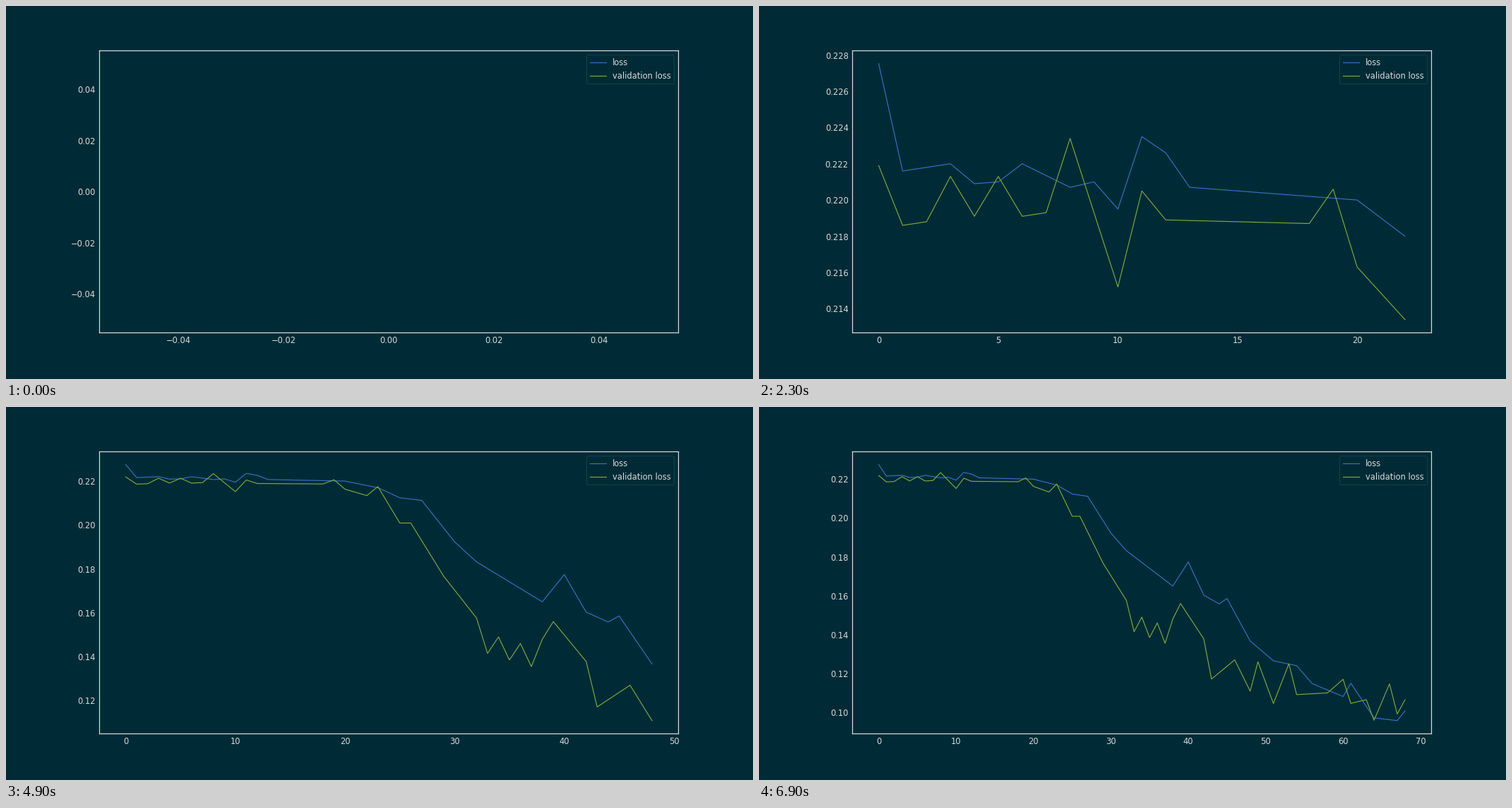
A matplotlib script that plays this animation: 1058 by 529 pixels, repeating every 7 s.

```python
import matplotlib.pyplot as plt
import numpy as np
from matplotlib.animation import FuncAnimation

DPI = 92
PX = 72 / DPI  # one pixel in points
FONT_SIZE = 9
BACKGROUND, TEXT, FAINT = "#002b36", "#d9d9d9", "#184650"
BLUE, GREEN = "#3572c6", "#83a83b"
EPOCHS = np.arange(69)


def curve(keys, swings=()):
    """Join (epoch, thousandths) turning points, adding cosine swings."""
    values = np.interp(EPOCHS, *zip(*keys))
    for first, last, period, size in swings:
        active = (EPOCHS >= first) & (EPOCHS <= last)
        values += active * size * np.cos(2 * np.pi * (EPOCHS - first) / period)
    return values / 1000


# A noisy plateau up to epoch 23, then a long descent.
loss = curve([
    (0, 227.53), (1, 221.6), (3, 222), (4, 220.9), (5, 221), (6, 222),
    (8, 220.7), (9, 221), (10, 219.5), (11, 223.5), (12, 222.6), (13, 220.7),
    (20, 220), (23, 217), (25, 212.4), (27, 211.2), (30, 192.3), (32, 183.2),
    (38, 165), (40, 177.4), (42, 160.3), (44, 155.8), (45, 158.6), (48, 136.7),
    (51, 126.5), (54, 124), (56, 114.8), (60, 108.1), (61, 115), (64, 97.1),
    (67, 95.74), (68, 100.7),
])
validation = curve([
    (0, 221.9), (1, 218.6), (2, 218.8), (3, 220.2), (6, 220.2), (7, 219.3),
    (8, 223.4), (10, 215.2), (11, 220.5), (12, 218.9), (18, 218.7), (19, 220.6),
    (20, 216.3), (22, 213.4), (23, 217.5), (25, 200.9), (26, 200.9), (29, 176.7),
    (32, 157.6), (33, 146), (37, 140), (39, 156), (42, 137.8), (43, 117.1),
    (46, 127), (48, 110.9), (49, 115.5), (53, 114.5), (54, 109.1), (58, 110),
    (60, 117), (61, 104.6), (63, 106.5), (64, 95.9), (66, 114.6), (67, 99.1),
    (68, 106.4),
], swings=[(3, 6, 2, 1.1), (33, 37, 2, -4.5), (49, 53, 4, 10.5)])

plt.rcParams.update({
    "font.family": "DejaVu Sans",
    "font.size": FONT_SIZE,
    "legend.fontsize": FONT_SIZE,
    "text.color": TEXT,
    "axes.facecolor": BACKGROUND,
    "axes.edgecolor": TEXT,
    "axes.linewidth": 1.25 * PX,
    "lines.linewidth": 1.15 * PX,
    "legend.edgecolor": FAINT,
    "patch.linewidth": PX,
})
for axis in ("xtick", "ytick"):
    plt.rcParams.update({
        f"{axis}.color": TEXT,
        f"{axis}.labelsize": FONT_SIZE,
        f"{axis}.major.size": 0,
        f"{axis}.major.pad": 5.6 * PX,
    })

fig = plt.figure(figsize=(1058 / DPI, 529 / DPI), dpi=DPI, facecolor=BACKGROUND)
ax = fig.add_axes([0.125, 0.125, 0.775, 0.755])


def draw(count):
    """Plot the first epochs; the axes rescale to the data each time."""
    ax.clear()
    ax.plot(EPOCHS[:count], loss[:count], color=BLUE, label="loss")
    ax.plot(EPOCHS[:count], validation[:count], color=GREEN, label="validation loss")
    ax.legend(loc="upper right")


anim = FuncAnimation(fig, draw, frames=len(EPOCHS) + 1, init_func=lambda: draw(0),
                     interval=100, repeat=True, repeat_delay=0)
plt.show()
```
